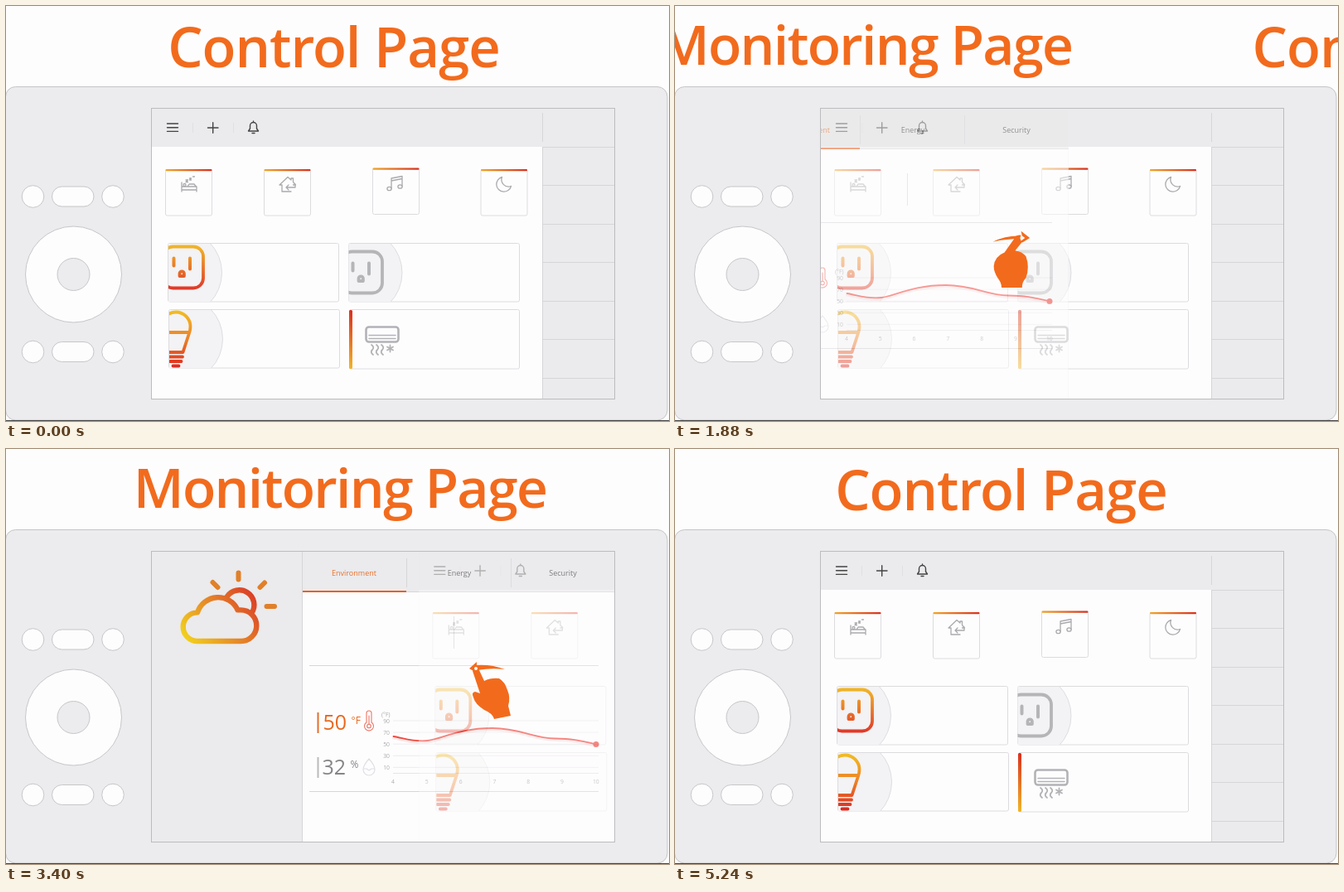
An HTML page that plays this animation: 800x501 px, repeating every 5.28 s.

```html
<!DOCTYPE html>
<html lang="en">
<head>
<meta charset="utf-8">
<title>Panel pages</title>
<style>
  html, body { margin: 0; width: 100%; height: 100%; overflow: hidden; background: #fefdfe; }
  svg { display: block; width: 100%; height: 100%; }
  text { font-family: "Open Sans", "Noto Sans", sans-serif; }
  .title { font-weight: 600; text-anchor: middle; fill: #f26b1d; }
  .line { fill: none; stroke-linecap: round; stroke-linejoin: round; }
  .rule { fill: none; stroke: #d6d5d8; }
  .card { fill: #fefdfe; stroke: #dcdcde; }
  .key { fill: #fefdfe; stroke: #c6c6c9; }
  .tab { font-size: 9px; text-anchor: middle; fill: #444; }
  .tick { font-size: 6.8px; fill: #aaa; }
</style>
</head>
<body>
<svg viewBox="0 0 800 501">
  <defs>
    <linearGradient id="across">
      <stop stop-color="#f0a62a"/><stop offset="1" stop-color="#d8301f"/>
    </linearGradient>
    <linearGradient id="plugFill" gradientUnits="userSpaceOnUse" x1="0" y1="290" x2="0" y2="342">
      <stop stop-color="#f0b528"/><stop offset="1" stop-color="#e0382a"/>
    </linearGradient>
    <linearGradient id="bulbFill" gradientUnits="userSpaceOnUse" x1="0" y1="368" x2="0" y2="436">
      <stop stop-color="#f2bd22"/><stop offset=".5" stop-color="#ec8128"/><stop offset="1" stop-color="#dc2a22"/>
    </linearGradient>
    <linearGradient id="barFill" x2="0" y2="1">
      <stop stop-color="#d8301f"/><stop offset="1" stop-color="#f0b528"/>
    </linearGradient>
    <linearGradient id="weatherFill" gradientUnits="userSpaceOnUse" x1="214" y1="236" x2="296" y2="172">
      <stop stop-color="#f3d91c"/><stop offset=".55" stop-color="#e58528"/><stop offset="1" stop-color="#db3f28"/>
    </linearGradient>
    <clipPath id="screenClip"><rect x="176" y="123.500" width="558.500" height="351"/></clipPath>
    <clipPath id="cardClip"><rect x="196" y="287" width="205" height="70"/></clipPath>
    <clipPath id="bulbClip"><rect x="197" y="367" width="205" height="70"/></clipPath>
    <g id="plug" class="line" stroke-width="3.800">
      <rect x="189.500" y="290.500" width="48.500" height="50" rx="12"/>
      <path d="M202.500 304.500v9M222 304.500v13" stroke-width="4"/>
      <path d="M209.500 326v-3a2.700 2.700 0 0 1 5.400 0v3z"/>
    </g>
    <circle id="disc" cx="208.500" cy="322" r="52" fill="#f3f2f4" stroke="#dddde0"/>
  </defs>

  <rect x="-.5" y="97.500" width="798.500" height="402.500" rx="12" fill="#ecebed" stroke="#c4c4c7"/>
  <path d="M0 500.500H800" stroke="#444"/>
  <g id="keys" class="key">
    <circle cx="81.500" cy="324" r="58"/>
    <circle cx="81.500" cy="324" r="19.500" fill="#ecebed"/>
  </g>

  <g id="screen" clip-path="url(#screenClip)">
    <g id="control">
      <rect x="176" y="123" width="559" height="352" fill="#ebeaec"/>
      <rect x="176" y="170" width="471" height="305" fill="#fefdfe"/>
      <path id="rows" class="rule"/>
      <g class="line" stroke="#444" stroke-width="1.400">
        <path d="M194.500 142h13M194.500 146.700h13M194.500 151.400h13M243.500 147h12.500M249.700 140.700v12.600"/>
        <path d="M292.500 151h12l-2-3v-3.500a4 4 0 0 0-8 0V148zM297 153.500h3M298.500 139v1"/>
      </g>
      <path class="rule" d="M225.500 141v12M274.500 141v12" opacity=".5"/>
      <g id="scenes"></g>
      <g class="line" stroke="#aaaaad" stroke-width="1.300">
        <path d="M212 213v11M212 222h18v2M230 221v-3h-18M219 218l2-3h6l2.500 3M214 216a1.500 1.500 0 1 0 3 0a1.500 1.500 0 1 0-3 0M217 210h2.500l-2.500 2.500h2.500M221.500 208h2l-2 2h2M225.500 206h2"/>
        <path d="M333 224v-8h-3l10-9.500 4 3.500v-2h2.500v4.500l3 3.500h-3M349 215v4h-11M341 216l-3 3 3 3M333 224h11"/>
        <path d="M465 220v-12l13-2.500v12M465 211l13-2.500"/>
        <ellipse cx="462.500" cy="220.500" rx="2.600" ry="2.200"/><ellipse cx="475.500" cy="218" rx="2.600" ry="2.200"/>
        <path d="M598.500 206.500a9 9 0 1 0 11 11a8.500 8.500 0 0 1-11-11z"/>
      </g>

      <rect class="card" x="195.500" y="286.500" width="206" height="70.500" rx="2"/>
      <g clip-path="url(#cardClip)"><use href="#disc"/><use href="#plug" stroke="url(#plugFill)"/></g>
      <rect class="card" x="413.500" y="286.500" width="206" height="70.500" rx="2"/>
      <g transform="translate(217.500)"><g clip-path="url(#cardClip)">
        <use href="#disc"/><use href="#plug" y="6" x="-1.500" stroke="#b5b5b8"/>
      </g></g>
      <rect class="card" x="196.500" y="366.500" width="206" height="70.500" rx="2"/>
      <g clip-path="url(#bulbClip)">
        <use href="#disc" x="1" y="80"/>
        <path class="line" stroke="url(#bulbFill)" stroke-width="3.800" d="M195 418h18.500l7.500-23q1.500-4 1.500-8a17.500 17.500 0 0 0-35 0M190 394h31M190 423.500h23M198 429h13.500M201.500 434.500h7"/>
      </g>
      <rect class="card" x="414.500" y="366.500" width="205" height="71.500" rx="2"/>
      <rect x="414" y="367" width="4" height="71" rx="1.500" fill="url(#barFill)"/>
      <g class="line" stroke="#b3b3b6" stroke-width="2.600">
        <rect x="434.500" y="387.500" width="39" height="18" rx="3.500"/>
        <path d="M438 397.500h32M438 401.500h32" stroke-width="1.500"/>
        <path d="M441 409q4 3 1 6t1 6M447 409q4 3 1 6t1 6M453 409q4 3 1 6t1 6M463.500 409.500v8M460 411.500l7 4M467 411.500l-7 4" stroke-width="1.800"/>
      </g>
    </g>

    <g id="monitor">
      <rect x="176" y="123" width="559" height="352" fill="#ebeaec"/>
      <rect x="357.500" y="172" width="377" height="303" fill="#fefdfe"/>
      <path class="rule" d="M357.500 123V475M357.500 172.500H735M483.500 132v35M609.500 132v35M540.500 202v39M366 261.500H715M366 413.500H715"/>
      <path d="M358 172H483" stroke="#e8601f" stroke-width="2"/>
      <text class="tab" x="420" y="152.500" style="fill:#e8702a">Environment</text>
      <text class="tab" x="547" y="152.500">Energy</text>
      <text class="tab" x="672" y="152.500">Security</text>

      <g class="line" stroke="url(#weatherFill)" stroke-width="6.400">
        <path d="M231 232a17.300 17.300 0 0 1 0-34.600a26 26 0 0 1 48.500-3h4a18.600 18.600 0 0 1 0 37.600z"/>
        <path d="M266.500 178.500a17 17 0 0 1 30 19.500"/>
      </g>
      <path class="line" stroke="#e0802a" stroke-width="6" d="M280.500 149.500v8M249.500 161l6 6M312 161.500l-5.500 5.500M314.500 190h9.500"/>

      <path d="M376.500 318v25" stroke="#e0702a" stroke-width="2"/>
      <path d="M376.500 372v25" stroke="#bbb" stroke-width="2"/>
      <g font-size="25">
        <text x="382.500" y="339" fill="#e8681e">50</text>
        <text x="381.500" y="393" fill="#858588">32</text>
        <text x="416.500" y="332" font-size="12" fill="#e8681e">°F</text>
        <text x="415.500" y="385" font-size="12" fill="#858588">%</text>
      </g>
      <g class="line" stroke="#ee7766" stroke-width="1.100">
        <path d="M435 330v-11a3 3 0 0 1 6 0v11a5.500 5.500 0 1 1-6 0zM438 322v10"/>
        <circle cx="438" cy="334.500" r="2.300"/>
      </g>
      <path class="line" stroke="#dfe0e5" stroke-width="1.200" d="M438 374q-7 8-7 13a7 7 0 0 0 14 0q0-5-7-13M431 386h4l3 2 3-2h4"/>
      <g id="chart"></g>
      <path class="line" stroke="#f6b9b2" stroke-width="3" opacity=".35" d="M467.500 349C480 351 492 356 509 354C526 352 546 339 587 339C620 339 636 351 662 351.500C690 352 695 355 712 358.500"/>
      <path class="line" stroke="#ee4a40" stroke-width="1.800" d="M467.500 347C480 349 492 354 509 352C526 350 546 337 587 337C620 337 636 349 662 349.500C690 350 695 353 712 356.500"/>
      <circle cx="712" cy="356.500" r="3.500" fill="#ee4a40"/>
    </g>
  </g>
  <rect x="175.500" y="123.500" width="559" height="351" fill="none" stroke="#bcbcbf"/>

  <text class="title" id="controlTitle" y="73.500" font-size="67" letter-spacing="-1">Control Page</text>
  <text class="title" id="monitorTitle" y="71" font-size="66" letter-spacing="-1.700">Monitoring Page</text>

  <g id="handRight" fill="#f26b1d">
    <path d="M-7-8L5-25Q13-28 12-20L4-10Q11-9 15-4Q19 7 15 18Q11 22 11 28H-10Q-10 23-14 18Q-18 12-18 6Q-17-4-7-8z"/>
    <path d="M-19-19Q-5-26 11-25L10-30L19-23L11-18L10-22Q-5-22-19-19z"/>
    <path d="M10-26l4 3-4 3-1-3z" fill="#fefdfe"/>
  </g>
  <g id="handLeft" fill="#f26b1d">
    <path d="M-22-22Q-19-28-14-23L-8-10Q0-14 10-13Q17-9 20 1Q24 10 21 20L24 32L4 36Q2 29-8 25Q-19 18-21 10Q-24 4-19 3L-13 5z"/>
    <path d="M-26-25L-17-33V-29Q1-30 17-24Q0-26-16-23V-19z"/>
    <circle cx="-18" cy="-25" r="2" fill="#fefdfe"/>
  </g>
</svg>
<script>
const LOOP = 5280, SCREEN_WIDTH = 558;
const el = id => document.getElementById(id);
const ramp = (t, from, to) => Math.min(1, Math.max(0, (t - from) / (to - from)));
const mix = (a, b, p) => a + (b - a) * p;

// Repeated static parts
for (const y of [230, 417.5]) {
  el('keys').insertAdjacentHTML('beforeend',
    `<circle cx="32.500" cy="${y}" r="13.300"/><circle cx="129" cy="${y}" r="13.300"/>
     <rect x="55.500" y="${y - 12}" width="50.500" height="24" rx="12"/>`);
}
let rows = 'M647.5 129V164M647.5 170V475';
for (let i = 0; i < 7; i++) rows += `M647 ${Math.floor(170 + i * 46.5) + .5}H735`;
el('rows').setAttribute('d', rows);
for (const [x, y] of [[192.5, 197.5], [311.5, 197.5], [442.5, 196], [573, 197.5]]) {
  el('scenes').insertAdjacentHTML('beforeend',
    `<rect class="card" x="${x}" y="${y}" width="56" height="55.500" rx="2"/>
     <rect x="${x}" y="${y - .5}" width="56" height="2.200" rx="1" fill="url(#across)"/>`);
}
let chart = '<text class="tick" x="453" y="323">(°F)</text><path class="rule" d="M467 391.500H715" opacity=".6"/>';
for (let i = 0; i < 5; i++) {
  const y = 328 + i * 14.1;
  chart += `<path class="rule" d="M467 ${y}H715" opacity=".45"/>
    <text class="tick" x="463" y="${y + 2.5}" text-anchor="end">${90 - i * 20}</text>`;
}
for (let i = 0; i < 7; i++) {
  chart += `<text class="tick" x="${467 + i * 40.8}" y="403.500" text-anchor="middle">${4 + i}</text>`;
}
el('chart').innerHTML = chart;

function place(node, x, y, scale, opacity) {
  node.setAttribute('transform', `translate(${x} ${y}) scale(${scale})`);
  node.setAttribute('opacity', opacity);
}

const veil = p => Math.min(1, (p / .72) ** 2);

function draw(t) {
  const returning = t >= 2700;
  const control = el('control'), monitor = el('monitor');
  const top = returning ? control : monitor;
  if (el('screen').lastElementChild !== top) el('screen').append(top);

  // The incoming page slides over the resting one while it fades in.
  const slide = returning ? ramp(t, 3197, 3680) : ramp(t, 1622, 2107);
  const shift = SCREEN_WIDTH * (1 - slide);
  place(top, returning ? shift : -shift, 0, 1, veil(slide));
  place(returning ? monitor : control, 0, 0, 1, 1);

  const controlOut = ramp(t, 1639, 1930), controlIn = ramp(t, 3400, 3680);
  const monitorIn = ramp(t, 1652, 1965), monitorOut = ramp(t, 3400, 3720);
  place(el('controlTitle'), returning ? 393.5 + 605 * (1 - controlIn) : 395.5 + 603 * controlOut, 0, 1,
    returning ? +(controlIn > 0) : +(controlOut < 1));
  place(el('monitorTitle'), 405 - 652 * (returning ? monitorOut : 1 - monitorIn), 0, 1,
    +(monitorIn > 0 && monitorOut < 1));

  place(el('handRight'), mix(300, 470, ramp(t, 1500, 2112)), 307, mix(1, 1.38, ramp(t, 1680, 2112)),
    ramp(t, 1160, 1440) * (1 - ramp(t, 2000, 2172)));
  place(el('handLeft'), mix(683, 449, ramp(t, 3200, 3680)), 290, 1,
    ramp(t, 3000, 3240) * (1 - ramp(t, 3680, 3900)));
}

function tick() {
  draw(performance.now() % LOOP);
  requestAnimationFrame(tick);
}
tick();
</script>
</body>
</html>
```
